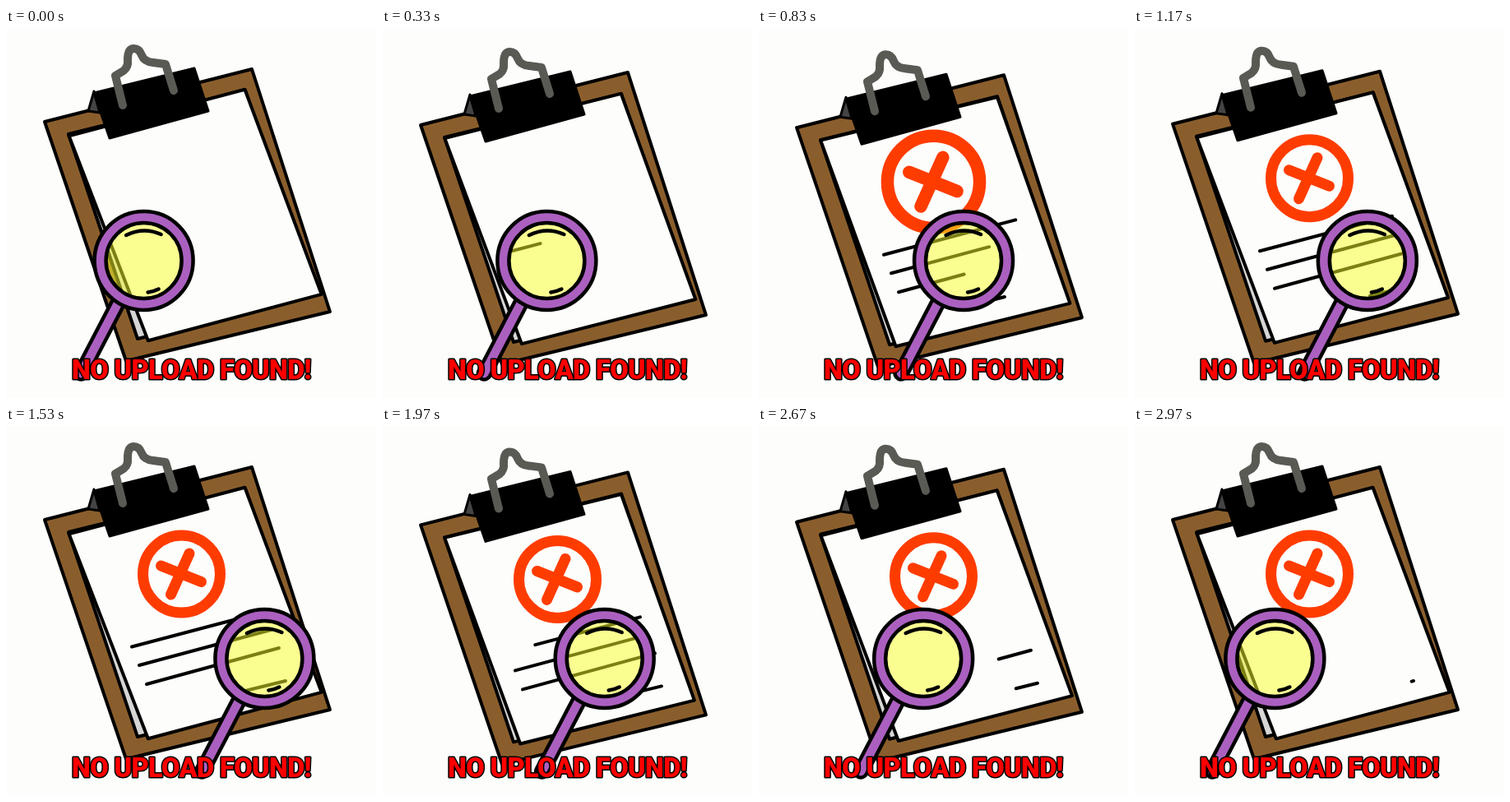
Animation, 450 px wide and 450 px high, one loop 3010 ms. Source, as an HTML page:

```html
<!DOCTYPE html>
<html lang="en">
<head>
<meta charset="utf-8">
<title>No upload found</title>
<style>
  html, body { margin: 0; width: 100%; height: 100%; overflow: hidden; background: #fdfdfb; }
  svg { display: block; width: 100%; height: 100%; }
  text { font-weight: 900; font-stretch: 62.5%; letter-spacing: -.02em; }
</style>
</head>
<body>
<svg viewBox="0 0 450 450" fill="none" stroke="#000" stroke-width="4" stroke-linecap="round" stroke-linejoin="round">
  <g id="board">
    <path d="M47 114 L299 50 L394 345 L146 405 Z" fill="#8a5e2c"/>
    <path d="M76 129 L291 76 L377 325 L160 378 Z" fill="#d6d6d6"/>
    <path id="sheet" d="M76 129 L291 77 L379 328 L167 380 Z" fill="#fdfdfb"/>
    <path d="M107 77 L100 101 L114 103 Z" fill="#444" stroke-width="3"/>
    <path d="M107 79 L229 49 L246 101 L126 134 Z" fill="#000" stroke-width="3"/>
    <path d="M142 94 L133 58 L143 52 Q149 47 148 39 Q148 25 155.500 25 Q162 25 165 33 Q168 41 179 42 L194 44 L204 76"
          stroke="#5a5a55" stroke-width="10"/>
    <g id="cross" stroke="#ff3c00">
      <circle r="47" stroke-width="13"/>
      <path d="M-25 -10 L24 9.500 M9.500 -25 L-13 25" stroke-width="13"/>
    </g>
    <g id="lines"></g>
  </g>
  <g id="lens">
    <path d="M-29 47 L-76 137" stroke-width="19.500"/>
    <path d="M-29 47 L-76 137" stroke="#ab60c0" stroke-width="10.500"/>
    <circle r="46" fill="#f8ff28" fill-opacity=".5" stroke="none"/>
    <circle r="53" stroke="#ab60c0" stroke-width="14"/>
    <circle r="60" stroke-width="4.500"/>
    <circle r="46" stroke-width="4.500"/>
    <path d="M-21.500 -31 Q0 -41.500 21 -32 M5 38.500 Q12 37.500 18 34.500" stroke-width="4.500"/>
  </g>
  <text id="caption" x="225.500" text-anchor="middle" fill="#f00" stroke-width="3" paint-order="stroke">NO UPLOAD FOUND!</text>
</svg>
<script>
const LOOP = 3010;
const HALF = LOOP / 2;
const SINK = 660;
const DRAW = 667;
const STAGGER = 167;
const rows = [
  [153, 268.5, 314, 226],
  [162, 291, 322, 248],
  [171, 314, 332, 270],
  [287, 323, 340, 310]
];

const $ = id => document.getElementById(id);
const clamp = v => Math.min(1, Math.max(0, v));
const mix = (a, b, u) => a + (b - a) * u;
const ramp = (t, from, to) => clamp((t - from) / (to - from));
const smooth = u => (1 - Math.cos(Math.PI * u)) / 2;

const lines = rows.map(() => {
  const line = document.createElementNS("http://www.w3.org/2000/svg", "line");
  return $("lines").appendChild(line);
});

// Uses the narrowest face at the largest size that fits the caption's room.
function setCaption() {
  const caption = $("caption");
  const widthIn = face => {
    caption.style.font = `normal 900 62.5px ${face}`;
    caption.style.fontStretch = "62.5%";
    caption.style.fontSize = "42px";
    return caption.getComputedTextLength();
  };
  const faces = ['"Noto Sans", sans-serif', '"Open Sans", sans-serif', "Roboto, sans-serif"];
  const best = faces.reduce((a, b) => widthIn(b) < widthIn(a) ? b : a);
  const size = 42 * Math.min(1, 291 / widthIn(best));
  caption.style.fontSize = size + "px";
  caption.setAttribute("y", 415 + size * 0.357);
}

function drawLine(line, [x1, y1, x2, y2], start, end) {
  line.style.display = end > start ? "" : "none";
  line.setAttribute("x1", mix(x1, x2, start));
  line.setAttribute("y1", mix(y1, y2, start));
  line.setAttribute("x2", mix(x1, x2, end));
  line.setAttribute("y2", mix(y1, y2, end));
}

function render(t) {
  const beat = t % HALF;
  const sink = smooth(beat < SINK ? beat / SINK : (HALF - beat) / (HALF - SINK));
  $("board").setAttribute("transform", `translate(0 ${8 * sink})`);
  $("sheet").setAttribute("transform", `rotate(${-1.2 * (1 - sink)} 183 102)`);

  const scale = 1.2 * ramp(t, 500, 833) - 0.2 * ramp(t, 833, 1000);
  $("cross").style.display = scale > 0 ? "" : "none";
  $("cross").setAttribute("transform", `translate(213.5 180) scale(${scale})`);

  lines.forEach((line, i) => {
    const drawn = 167 + i * STAGGER;
    const erased = 1833 + i * STAGGER;
    drawLine(line, rows[i], ramp(t, erased, erased + DRAW), ramp(t, drawn, drawn + DRAW));
  });

  const sweep = 1 - Math.abs(t - HALF) / HALF;
  $("lens").setAttribute("transform", `translate(${mix(167.5, 317, sweep)} 283)`);
}

const began = performance.now();
function tick() {
  render((performance.now() - began) % LOOP);
  requestAnimationFrame(tick);
}
setCaption();
tick();
</script>
</body>
</html>
```
